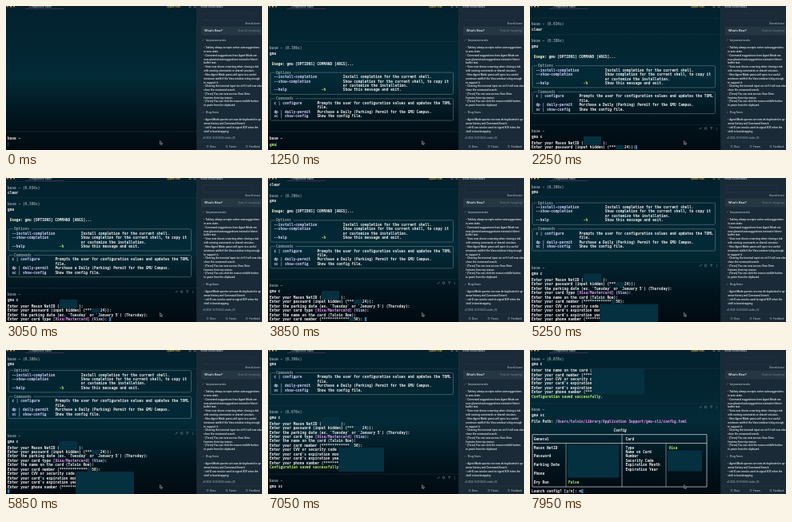
An HTML page with a canvas for the animation above (8 s loop, 320 by 180 pixels).

```html
<!DOCTYPE html>
<html lang="en">
<head>
<meta charset="utf-8">
<title>Terminal session</title>
<style>
html, body { margin: 0; width: 100%; height: 100%; overflow: hidden; background: #03151f; }
canvas { display: block; width: 100vw; height: 100vh; }
</style>
</head>
<body>
<canvas id="stage"></canvas>
<script>
const LOOP = 8000, W = 320, H = 180;
const ROW = 5.45, COL = 2.7, LEFT = 2, TO_COMMAND = 6.9, TO_OUTPUT = 7.6;
const MONO = '"DejaVu Sans Mono", monospace', SANS = 'Roboto, sans-serif';
const C = { text: '#f1f1f1', dim: '#8b9da3', cyan: '#d0d1fe', green: '#b4fa72', yellow: '#fefdc2',
  magenta: '#ee9cf4', frame: '#87989e', mask: '#05303f', cursor: '#2384b4' };
const canvas = document.getElementById('stage'), g = canvas.getContext('2d');

function text(str, x, y, color = C.text, size = 4.48, font = MONO, weight = 'bold', align = 'left') {
  g.save();
  g.translate(x, y + size * .34);
  g.scale(.05, .05);
  g.font = `${weight} ${size * 20}px ${font}`;
  g.textAlign = align;
  g.fillStyle = color;
  g.fillText(str, 0, 0);
  g.restore();
}
function rect(x, y, w, h, color) { g.fillStyle = color; g.fillRect(x, y, w, h); }
function box(x, y, w, h, color, radius = 0, width = .5) {
  g.strokeStyle = color;
  g.lineWidth = width;
  g.beginPath();
  g.roundRect(x, y, w, h, radius);
  g.stroke();
}
function stroke(color, width, ...points) {
  g.strokeStyle = color;
  g.lineWidth = width;
  g.beginPath();
  points.forEach(([x, y], i) => i ? g.lineTo(x, y) : g.moveTo(x, y));
  g.stroke();
}
const atCol = col => LEFT + col * COL;

// A line is a list of [column, text, color, weight].
const pair = (label, col, info, extra = []) => [[2, label, C.cyan], ...extra, [col, info]];
const helpLines = [
  [], [[1, 'Usage:', C.yellow], [8, 'gmu [OPTIONS] COMMAND [ARGS]...']], [],
  [[3, 'Options', C.dim]],
  pair('--install-completion', 34, 'Install completion for the current shell.'),
  pair('--show-completion', 34, 'Show completion for the current shell, to copy it'),
  [[34, 'or customize the installation.']],
  pair('--help', 34, 'Show this message and exit.', [[24, '-h', C.green]]),
  [],
  [[3, 'Commands', C.dim]],
  pair('c | configure', 22, 'Prompts the user for configuration values and updates the TOML'),
  [[22, 'file.']],
  pair('dp | daily-permit', 22, 'Purchase a Daily (Parking) Permit for the GMU Campus.'),
  pair('sc | show-config', 22, 'Show the config file.'),
  [], []
];
function helpFrames(y) {
  for (const [from, to, gap] of [[3, 8, 11], [9, 14, 12]]) {
    const top = y + from * ROW, bottom = y + to * ROW, right = atCol(85);
    stroke(C.frame, .45, [atCol(2.6), top], [4, top], [3, top + 1], [3, bottom - 1], [4, bottom],
      [right - 1, bottom], [right, bottom - 1], [right, top + 1], [right - 1, top], [atCol(gap), top]);
  }
}

// Prompts follow one another at a steady pace, each answered with Enter.
const FIRST_PROMPT = 1650, PROMPT_STEP = 400, SAVED = 6100;
const prompts = [
  [[0, 'Enter your Mason NetID ('], [33, '):']],
  [[0, 'Enter your password (input hidden) (***'], [43, '24)):']],
  [[0, 'Enter the parking date (ex. `Tuesday` or `January 5`) (Thursday):']],
  [[0, 'Enter your card type'], [21, '[Visa/Mastercard]', C.magenta], [39, '(Visa)', C.cyan], [45, ': ']],
  [[0, 'Enter the name on the card (Talvin Roe): ']],
  [[0, 'Enter your card number (*************'], [39, '50): ']],
  [[0, 'Enter your CVV or security code (']],
  [[0, "Enter your card's expiration month"]],
  [[0, "Enter your card's expiration year"]],
  [[0, 'Enter your phone number (**********']],
  [[0, '']]
];
const savedLine = [[0, 'Configuration saved successfully.', C.green]];
function promptLines(t) {
  if (t >= SAVED) return [...prompts.slice(0, -1), savedLine];
  return prompts.slice(0, Math.max(0, Math.floor((t - FIRST_PROMPT) / PROMPT_STEP) + 1));
}
function promptMasks(y, t, count) {
  const cover = (x, row, w, rows) => rect(x, y + (row - .5) * ROW, w, rows * ROW, C.mask);
  cover(67, -1, 22, 2);
  if (count > 1) cover(atCol(39), 1, 10, 1);
  if (count > 5) cover(atCol(37), 5, 5, 1);
  if (t >= 7350) cover(77, 4, 66, 6);
  else if (t >= SAVED) cover(88, 6, 57, 5.5);
  else if (count > 9) cover(87, 6, 73, 5.5);
  else if (count > 6) cover(94, 6, 81, 5.5);
}

const leftLabels = ['Mason NetID', 'Password', 'Parking Date', 'Phone', 'Dry Run'];
const rightLabels = ['Type', 'Name on Card', 'Number', 'Security Code', 'Expiration Month', 'Expiration Year'];
const configLines = Array.from({ length: 17 }, () => []);
configLines[0] = [[0, 'File Path:'], [11, '/Users/talvin/Library/Application Support/gmu-cli/config.toml', C.magenta]];
configLines[2] = [[38, 'Config', C.text, 'italic bold']];
configLines[4] = [[1, 'General'], [43.5, 'Card']];
leftLabels.forEach((label, i) => configLines[6 + 2 * i].push([1, label]));
rightLabels.forEach((label, i) => configLines[6 + i].push([43.5, label]));
configLines[6].push([63.5, 'Visa', C.green]);
configLines[14].push([17, 'False', C.green]);
function configTable(y) {
  const top = y + 3 * ROW, bottom = y + 15 * ROW, head = y + 5 * ROW;
  box(3, top, 218, bottom - top, C.text, 0, .65);
  stroke(C.text, .65, [3, head], [221, head]);
  stroke(C.text, .55, [115, top], [115, bottom]);
  stroke(C.text, .45, [45, head], [45, bottom]);
  stroke(C.text, .45, [170, head], [170, bottom]);
  rect(47, head + 2, 64, 41, C.mask);
  rect(172, head + 9, 43, 26, C.mask);
}

// Typed commands: the key presses, Enter, then the return of the prompt.
const commands = [
  { keys: [150, 250, 350], run: 480, end: 700, cmd: 'gmu', time: '0.386s' },
  { keys: [950, 1050, 1150, 1300, 1380], run: 1450, end: SAVED, cmd: 'gmu c', time: '8.078s' },
  { keys: [6300, 6400, 6500, 6600, 6750, 6850], run: 7000, end: Infinity, cmd: 'gmu sc' }
];
const shown = (times, t) => times.filter(k => t >= k).length;

function outputOf(i, t) {
  if (i === 0) return t >= commands[0].end ? helpLines : [];
  if (i === 1) return promptLines(t);
  if (t < 7350) return [];
  const lines = configLines.slice();
  lines[16] = [[0, 'Launch config? [y/n]: ' + (t >= 7800 ? 'n' : '')]];
  return lines;
}

function heading(block, y) {
  text('base ~' + (block.done ? ` (${block.time})` : ''), LEFT, y, C.dim);
  text(block.cmd, LEFT, y + TO_COMMAND);
}

function toolbar(y) {
  stroke(C.dim, .7, [212, y + 1.2], [214.5, y - 1.3]);
  box(218.5, y - 1.3, 2.2, 2.5, C.dim, .5);
  stroke(C.dim, .5, [225, y - 1.3], [228, y - 1.3], [226.5, y], [226.5, y + 1.5]);
  [-1.3, 0, 1.3].forEach(d => rect(233, y + d, .6, .6, C.dim));
}

function drawBlocks(t) {
  const blocks = commands.filter(c => t >= c.run).map((c, i) =>
    ({ ...c, done: t >= c.end, lines: outputOf(i, t), index: i }));
  const active = blocks.at(-1);
  const idle = !active || active.done;
  if (t >= commands[1].run) blocks.unshift({ cmd: 'clear', time: '0.034s', done: true, lines: [], index: -1 });

  let last = idle ? 148.5 : active.lines.length ? 176.5 : 170;
  for (const block of blocks.reverse()) {
    const n = block.lines.length;
    if (!n && block !== active) last += 2.5;
    const first = last - Math.max(0, n - 1) * ROW;
    const command = n ? first - TO_OUTPUT : last;
    const base = command - TO_COMMAND;
    stroke('#24424d', .35, [0, base - 8], [239, base - 8]);
    block.lines.forEach((line, row) => line.forEach(([col, str, color, weight]) =>
      text(str, atCol(col), first + row * ROW, color, 4.48, MONO, weight)));
    if (block === active && !idle) {
      toolbar(base - 3.5);
      if (n) {
        const [col, str] = block.lines[n - 1].at(-1);
        rect(atCol(col + str.length), last - 2.5, 2.4, 5, C.cursor);
      }
    }
    if (block.index === 0 && n) helpFrames(first);
    if (block.index === 1 && n) promptMasks(first, t, n);
    if (block.index === 2 && n) configTable(first);
    if (base < 11 && last > 20) {
      rect(0, 4, 239, 19.5, '#03222f');
      stroke('#24424d', .35, [0, 23.5], [239, 23.5]);
      heading(block, 11);
    } else heading(block, base);
    last = base - 16.5;
  }

  if (idle) {
    const next = commands.find(c => t < c.run);
    const typed = next.cmd.slice(0, shown(next.keys, t));
    stroke('#24424d', .4, [0, 157], [239, 157]);
    text('base ~', LEFT, 165);
    text(typed, LEFT, 173, C.green);
    rect(atCol(typed.length) + .2, 170.5, .6, 5, C.cursor);
  }
}

const notes = [
  [52, '• Tab key always accepts active autosuggestions', 'in zero state.'],
  [61.8, '• Command suggestions from Agent Mode are', 'now ghosted autosuggestions instead of direct', 'buffer text.'],
  [76.3, '• Vexo now shows a warning when closing a tab', 'with running commands or shared sessions.'],
  [86, '• New Agent Mode panes will open to a useful', 'minimum width if the Vexo window is big enough', 'to support it.'],
  [100.3, '• Clearing the terminal input via ctrl-U will now also', 'close the command search.'],
  [109.8, '• [Tervo] You can now access Vexo Drive', 'features from top menus.'],
  [119, '• [Tervo] You can click the mouse middle-button', 'to paste from the clipboard.'],
  [142.3, '• Agent Mode queries are now de-duplicated in up-', 'arrow history and Command Search'],
  [152, '• ctrl-D can now be used to signal EOF when the', 'shell is bootstrapping']
];
function drawPanel() {
  const label = (str, x, y, color, size = 3, weight = 500, align) => text(str, x, y, color, size, SANS, weight, align);
  rect(239, 0, 81, H, '#1a2a36');
  rect(238.5, 0, .5, H, '#30434d');
  label('Vexo Essentials', 243, .8, '#b4c3cc', 4);
  box(246, 9, 62, 9, '#28365c', 1);
  label('Show all at once', 318, 22, '#a5b4bd', 2.6, 500, 'right');
  rect(244, 25.5, 76, 11, '#243743');
  label("What's New?", 248, 31, '#e6eef2', 4);
  label('Read all changelogs', 318, 31, '#70858f', 3.1, 400, 'right');
  for (const [str, y] of [['Improvements', 42.5], ['Bug fixes', 133]]) {
    stroke('#8999a3', .5, [245.5, y + 1], [247.5, y - 1]);
    label(str, 250, y, '#a3b3bc', 3.9);
  }
  for (const [y, ...lines] of notes)
    lines.forEach((line, i) => label(line, 247.3, y + i * 4.8, '#e0e8ec', 3.2));
  label('v0.2024.10.29.08.02.stable_02', 246, 165, '#91a2ac', 2.9);
  stroke('#30434d', .4, [240, 170], [320, 170]);
  [['Docs', 255], ['Forum', 279], ['Feedback', 304]].forEach(([str, x]) => {
    box(x - 4, 174.5, 2, 2, '#91a2ac', .5);
    label(str, x, 175.6, '#a5b4bd', 3.1);
  });
}

function drawChrome() {
  rect(0, 0, 239, 4, '#08202b');
  ['#d96159', '#d9aa49', '#52ae5b'].forEach((color, i) => rect(1 + i * 4, 0, 2, 1.5, color));
  text('~/responsive-cabin', 28, .6, '#b8c4c9', 3.3, SANS, 500);
  stroke('#6a4a78', .5, [24, 3.5], [72, 3.5]);
  text('Update Vexo', 201, .5, '#d8bd4d', 3, SANS, 500);
  box(229, -1, 2, 2.5, '#9aa9b0');
  box(235, -1, 2, 2.5, '#9aa9b0');
}

function drawPointer() {
  g.beginPath();
  [[192.5, 168.5], [192.5, 172.9], [193.6, 172], [194.4, 173.6], [195.1, 173.2], [194.3, 171.7], [195.7, 171.6]]
    .forEach(([x, y], i) => i ? g.lineTo(x, y) : g.moveTo(x, y));
  g.closePath();
  g.fillStyle = '#0a0f12';
  g.fill();
  g.strokeStyle = '#fff';
  g.lineWidth = .4;
  g.stroke();
}

function draw(t) {
  const ratio = devicePixelRatio || 1;
  const w = Math.round(innerWidth * ratio), h = Math.round(innerHeight * ratio);
  if (canvas.width !== w || canvas.height !== h) { canvas.width = w; canvas.height = h; }
  g.setTransform(w / W, 0, 0, h / H, 0, 0);
  const sky = g.createLinearGradient(0, 0, 0, H);
  sky.addColorStop(0, '#03202d');
  sky.addColorStop(.5, '#032a37');
  sky.addColorStop(.8, '#01131c');
  sky.addColorStop(1, '#010a11');
  g.fillStyle = sky;
  g.fillRect(0, 0, W, H);
  drawBlocks(t);
  drawChrome();
  drawPanel();
  drawPointer();
}

const start = performance.now();
function tick() {
  draw((performance.now() - start) % LOOP);
  requestAnimationFrame(tick);
}
tick();
</script>
</body>
</html>
```
